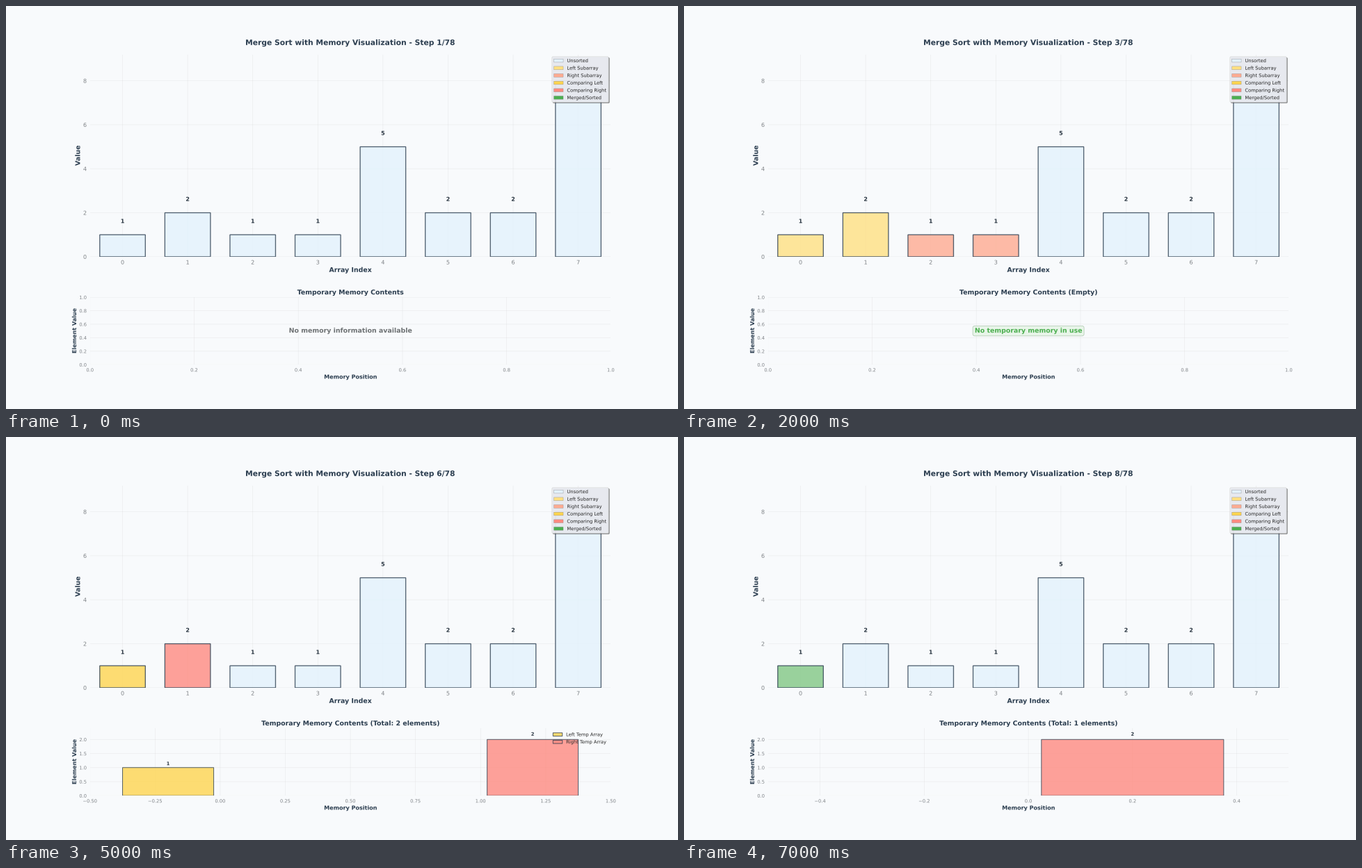
Recreate the animation shown at these times as a matplotlib script. Size 966x580 px, loop 8000 ms.

```python
import matplotlib.pyplot as plt
from matplotlib.animation import FuncAnimation
from matplotlib.patches import Patch
from matplotlib.patheffects import Stroke

DPI = 48.3
BG, INK, GRAY = "#F8FAFC", "#2C3E50", "#808488"
UNSORTED, LEFT, RIGHT = "#E3F2FD", "#FFE082", "#FFAB91"
CMP_LEFT, CMP_RIGHT = "#FFD54F", "#FF8A80"
MERGED, PLACED = "#4CAF50", "#81C784"
VALUES = [1, 2, 1, 1, 5, 2, 2, 8]
TOTAL_STEPS = 78

plt.rcParams.update({
    "font.family": "DejaVu Sans",
    "text.hinting": "none",
    # Draws text as outlines too, so nothing is rounded to whole pixels.
    "path.effects": [Stroke(snap=False)],
    "axes.facecolor": BG,
    "axes.axisbelow": True,
    "axes.edgecolor": "none",
    "axes.labelcolor": INK,
    "axes.labelweight": "bold",
    "axes.titleweight": "bold",
    "axes.titlecolor": INK,
    "axes.grid": True,
    "grid.color": "0.8",
    "grid.alpha": 0.3,
    "grid.linewidth": 1,
    "xtick.major.size": 0,
    "ytick.major.size": 0,
    "xtick.major.pad": 7,
    "ytick.major.pad": 7,
    "legend.fontsize": 10,
    "legend.labelspacing": 0.58,
})

# Each step: colours of the leading bars, then the memory panel:
# None = no information, otherwise (left, right) temporary arrays.
STEPS = [
    ([], None),
    ([LEFT] * 4 + [RIGHT] * 4, ([], [])),
    ([LEFT] * 2 + [RIGHT] * 2, ([], [])),
    ([LEFT, RIGHT], ([], [])),
    ([CMP_LEFT, CMP_RIGHT], None),
    ([CMP_LEFT, CMP_RIGHT], ([1], [2])),
    ([MERGED, CMP_RIGHT], ([1], [2])),
    ([PLACED], ([], [2])),
]

LEGEND = [
    ("Unsorted", UNSORTED), ("Left Subarray", LEFT),
    ("Right Subarray", RIGHT), ("Comparing Left", CMP_LEFT),
    ("Comparing Right", CMP_RIGHT), ("Merged/Sorted", MERGED),
]

fig, (top, mem) = plt.subplots(
    2, 1, figsize=(966 / DPI, (580 + 1e-6) / DPI), dpi=DPI, facecolor=BG,
    gridspec_kw=dict(height_ratios=[3, 1], hspace=0.3, left=0.125,
                     right=0.9, bottom=0.11, top=0.88))


def bars(ax, xs, heights, colors, width, lw, label=None):
    ax.bar(xs, heights, width, color=colors, edgecolor=INK,
           linewidth=lw, alpha=0.8, label=label)


def value_label(ax, x, y, value, size):
    ax.text(x, y, str(value), ha="center", va="bottom", fontsize=size,
            fontweight="bold", color="#2B3743")


def draw_array(step, colors):
    top.clear()
    colors = colors + [UNSORTED] * (len(VALUES) - len(colors))
    bars(top, range(len(VALUES)), VALUES, colors, 0.7, 2)
    for x, v in enumerate(VALUES):
        value_label(top, x, v + 0.06 * max(VALUES), v, 12)
    top.set_xlim(-0.5, len(VALUES) - 0.5)
    top.set_ylim(0, max(VALUES) * 1.15)
    top.set_xticks(range(len(VALUES)))
    top.tick_params(labelsize=12, labelcolor=GRAY)
    top.set_title("Merge Sort with Memory Visualization - "
                  f"Step {step}/{TOTAL_STEPS}", fontsize=16, pad=20)
    top.set_xlabel("Array Index", fontsize=14)
    top.set_ylabel("Value", fontsize=14)
    handles = [Patch(facecolor=c, edgecolor="gray", linewidth=0.5, label=name)
               for name, c in LEGEND]
    top.legend(handles=handles, loc="upper right", frameon=True, shadow=True,
               framealpha=0.9, facecolor="#F0F2F8", edgecolor="0.8",
               labelcolor="0.15")


def message(text, color, bbox=None):
    mem.text(0.5, 0.5, text, transform=mem.transAxes, ha="center",
             va="center", fontsize=14, fontweight="bold", color=color,
             bbox=bbox)


def draw_memory(arrays):
    mem.clear()
    title = "Temporary Memory Contents"
    if arrays is None:
        message("No memory information available", "#6E7274")
    elif not any(arrays):
        title += " (Empty)"
        message("No temporary memory in use", MERGED,
                dict(boxstyle="round,pad=0.3", facecolor="#E8F5E9",
                     edgecolor="#A9C4AB", linewidth=1))
    else:
        left, right = arrays
        count = len(left) + len(right)
        title += f" (Total: {count} elements)"
        groups = [(left, 0, -0.2, CMP_LEFT, "Left Temp Array"),
                  (right, len(left), 0.2, CMP_RIGHT, "Right Temp Array")]
        for data, start, shift, color, name in groups:
            if not data:
                continue
            xs = [start + i + shift for i in range(len(data))]
            bars(mem, xs, data, color, 0.35, 1.5, name)
            for x, v in zip(xs, data):
                value_label(mem, x, v * 1.05, v, 10)
        mem.set_xlim(-0.5, count - 0.5)
        mem.set_ylim(0, max(left + right) * 1.2)
        if left and right:
            mem.legend(loc="upper right", frameon=False, labelcolor="0.15")
    mem.tick_params(labelsize=10, labelcolor=GRAY)
    mem.set_title(title, fontsize=14)
    mem.set_xlabel("Memory Position", fontsize=12)
    mem.set_ylabel("Element Value", fontsize=12)


def update(i):
    colors, arrays = STEPS[i]
    draw_array(i + 1, colors)
    draw_memory(arrays)
    return []


anim = FuncAnimation(fig, update, frames=len(STEPS), interval=1000,
                     init_func=lambda: [], repeat=True, repeat_delay=0)
plt.show()
```
